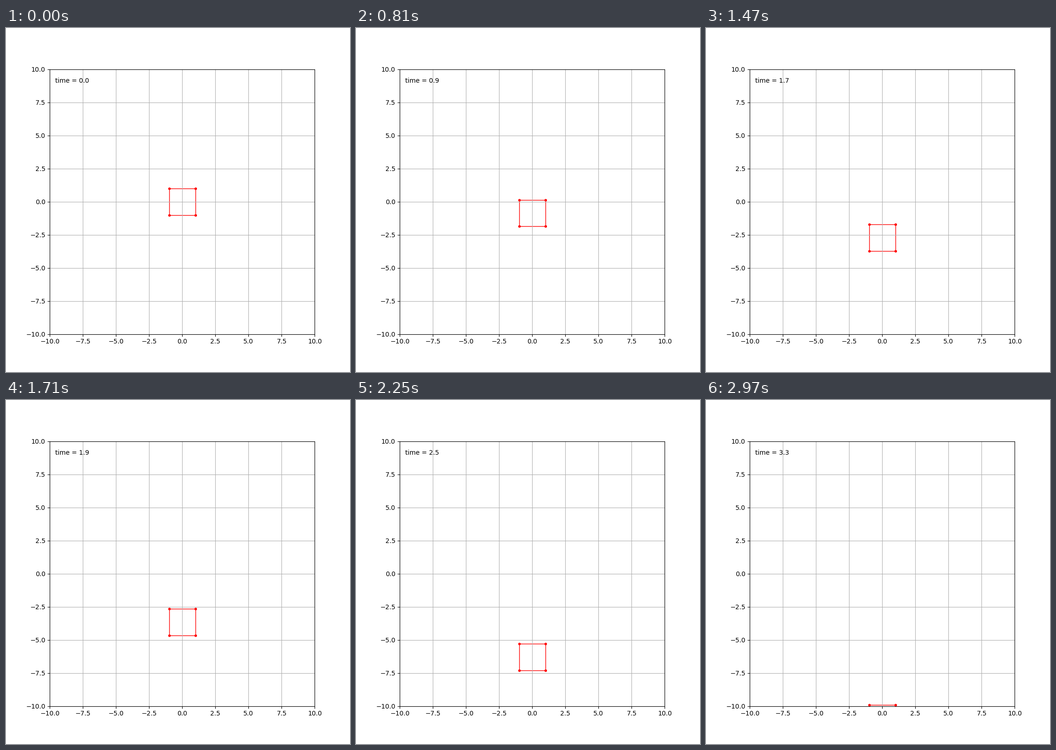
Recreate the animation shown at these times as a matplotlib script. Size 748 by 748 pixels, loop 3 s.

```python
import numpy as np
import matplotlib.pyplot as plt
from matplotlib.animation import FuncAnimation
from matplotlib.patches import Polygon

FRAMES = 100
INTERVAL = 30          # ms
DT = 1 / 30            # simulated seconds per frame
GRAVITY = 1.96
CORNERS = np.array([(-1, -1), (1, -1), (1, 1), (-1, 1)], dtype=float)

fig, ax = plt.subplots(figsize=(7.48, 7.48), dpi=100)
ax.set_xlim(-10, 10)
ax.set_ylim(-10, 10)
ax.set_aspect("equal")
ax.grid()

# The outline is a patch, so the grid passes over it.
box = ax.add_patch(Polygon(CORNERS, closed=True, fill=False, ec="red", lw=1))
dots, = ax.plot([], [], "r.", ms=6)
label = ax.text(0.02, 0.95, "", transform=ax.transAxes)


def update(i):
    t = (i + 1) * DT
    pts = CORNERS - (0, GRAVITY * t**2 / 2)
    box.set_xy(pts)
    dots.set_data(pts[:, 0], pts[:, 1])
    label.set_text(f"time = {t:.1f}")
    return box, dots, label


anim = FuncAnimation(fig, update, frames=FRAMES, interval=INTERVAL,
                     repeat=True, repeat_delay=0)
plt.show()
```
